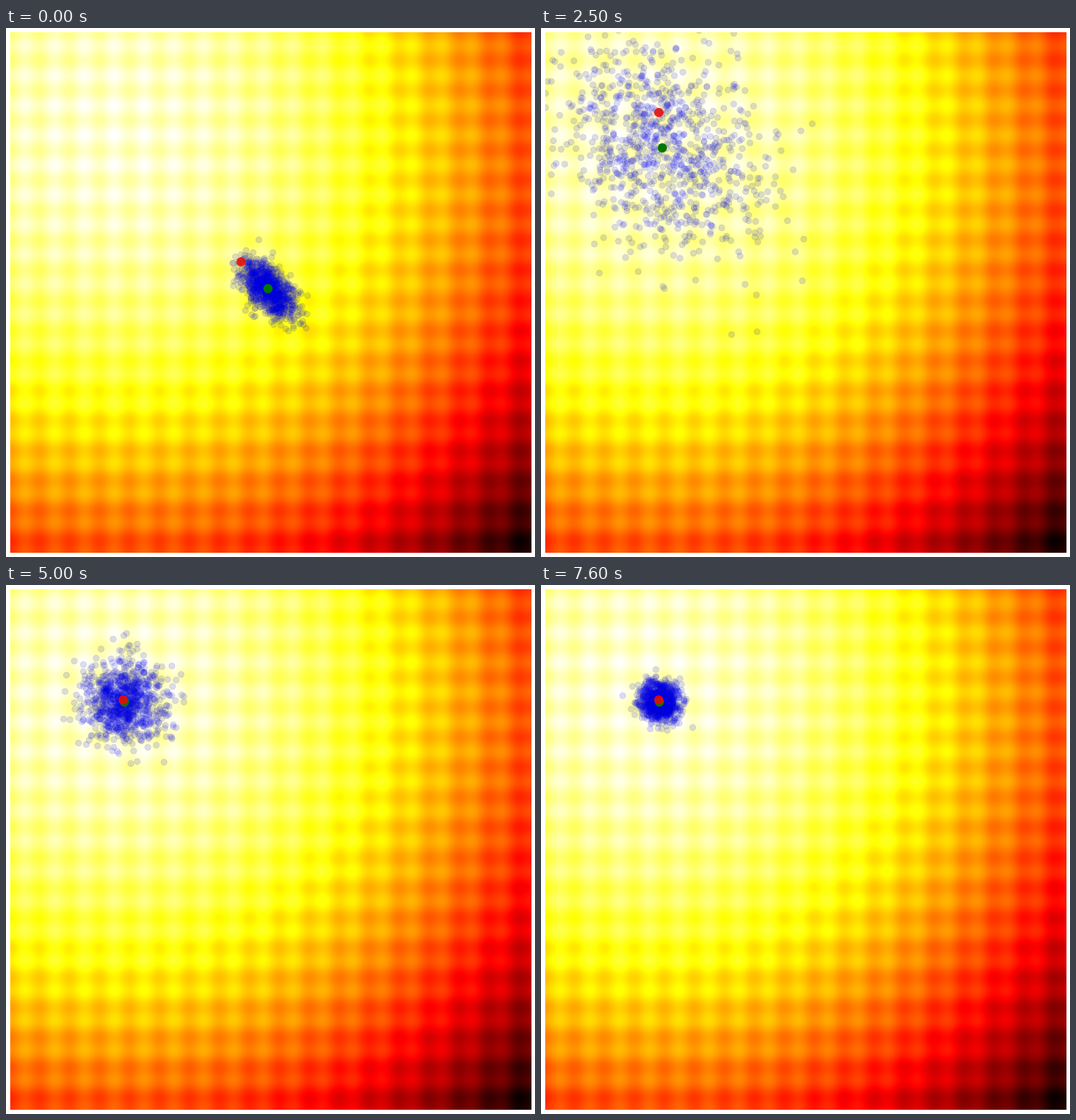
A matplotlib script for the animation above (7700 ms loop, 748 by 748 pixels).

```python
import matplotlib.pyplot as plt
import numpy as np
from matplotlib.animation import FuncAnimation

SIZE, DPI = 748, 100
LEFT, RIGHT, TOP, BOTTOM = 6, 743, 6, 742
FRAMES, INTERVAL = 77, 100
POINTS = 1000
PERIOD = 42.24                      # pixels per unit of the landscape
CENTER = np.array((153.2, 152.6))   # bottom of the painted landscape
GOAL = np.array((165, 163))         # where the search settles
START, END = np.array((370, 368)), np.array((167, 165))
TILT = np.radians(50)

# The cloud stretches along the slope, then rounds off and shrinks.
STAGES = (0, 15, 25, 43, 62, 76)
MAJOR = np.log((25, 178, 83, 33, 24, 14.5))
MINOR = np.log((13, 51, 64, 31, 22, 13))


def rastrigin(u):
    return u ** 2 - 10 * np.cos(2 * np.pi * u) + 10


def landscape():
    x = (np.arange(LEFT, RIGHT) + 0.5 - CENTER[0]) / PERIOD
    y = (np.arange(TOP, BOTTOM) + 0.5 - CENTER[1]) / PERIOD
    return -(rastrigin(y)[:, None] + rastrigin(x)[None, :])


def mean_at(frame):
    return END + (START - END) / (1 + np.exp(0.433 * (frame - 16)))


def sample(frame):
    major, minor = (np.exp(np.interp(frame, STAGES, s)) for s in (MAJOR, MINOR))
    c, s = np.cos(TILT), np.sin(TILT)
    z = np.random.default_rng(frame + 100).standard_normal((POINTS, 2))
    return mean_at(frame) + z * (major, minor) @ np.array(((c, s), (-s, c)))


def best_of(points):
    cost = rastrigin((points - GOAL) / PERIOD).sum(axis=1)
    return points[cost.argmin()]


def dots(diameter, **style):
    return ax.scatter([], [], s=(diameter * 72 / DPI) ** 2, **style)


fig = plt.figure(figsize=(SIZE / DPI, SIZE / DPI), dpi=DPI, facecolor="white")
ax = fig.add_axes([LEFT / SIZE, 1 - BOTTOM / SIZE,
                   (RIGHT - LEFT) / SIZE, (BOTTOM - TOP) / SIZE])
ax.imshow(landscape(), cmap="hot", extent=(LEFT, RIGHT, BOTTOM, TOP),
          interpolation="nearest", aspect="auto")
ax.set_xlim(LEFT, RIGHT)
ax.set_ylim(BOTTOM, TOP)
ax.axis("off")

cloud = dots(8.6, facecolors=(0, 0, 1, 0.14), edgecolors=(0, 0, 0.5, 0.1),
             linewidths=0.6, zorder=2)
mean_dot = dots(13, color="#007800", linewidths=0, zorder=3)
best_dot = dots(13, color=(0.93, 0.04, 0.04, 0.88), linewidths=0, zorder=4)


def update(frame):
    points = sample(frame)
    cloud.set_offsets(points)
    mean_dot.set_offsets([mean_at(frame)])
    best_dot.set_offsets([best_of(points)])
    return cloud, mean_dot, best_dot


anim = FuncAnimation(fig, update, frames=FRAMES, interval=INTERVAL,
                     init_func=lambda: update(0), repeat=True)
plt.show()
```
